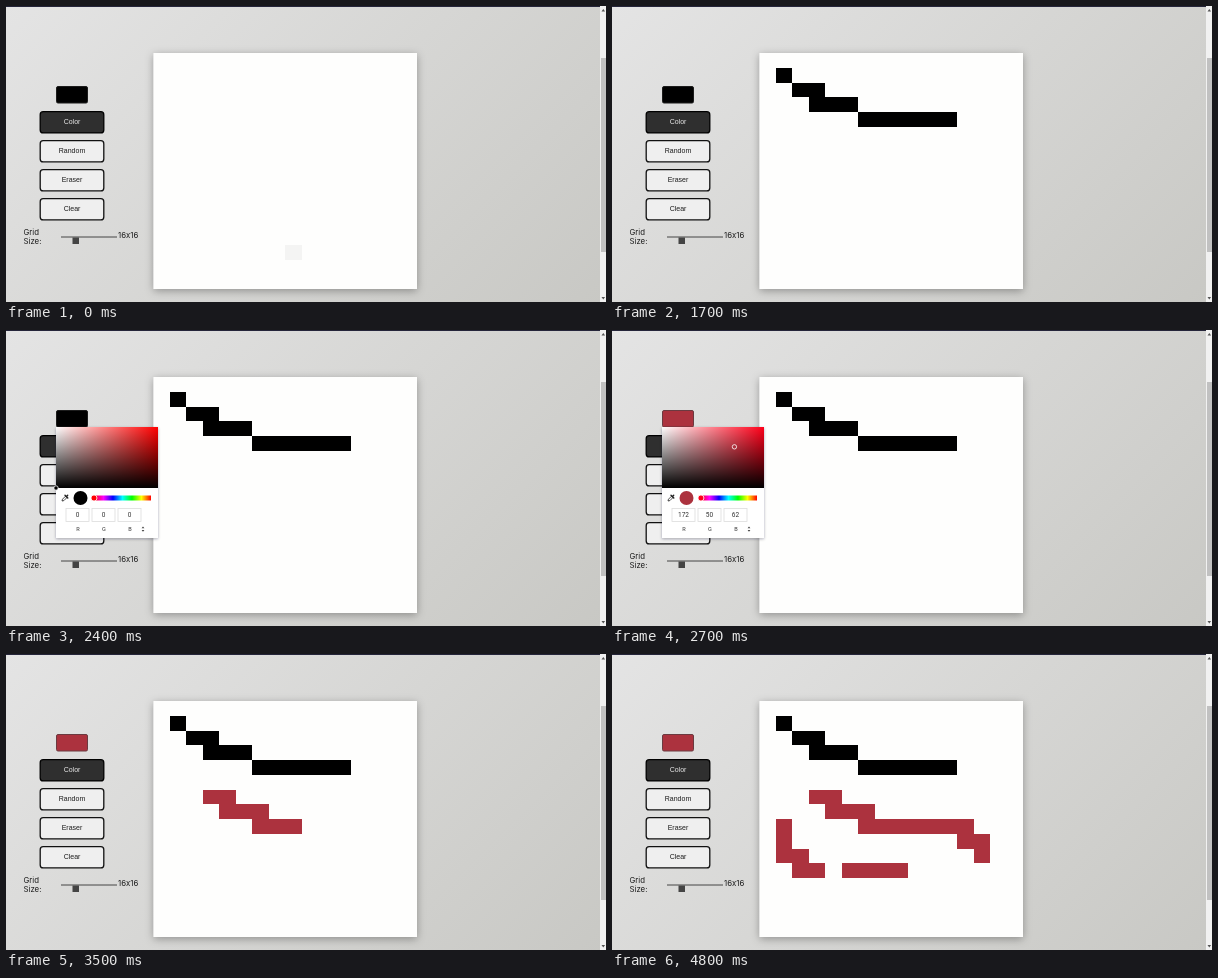
Recreate the animation shown at these times as an HTML page. Size 600 by 296 pixels, loop 5.2 s.

```html
<!DOCTYPE html>
<html lang="en">
<head>
<meta charset="utf-8">
<title>Sketch pad</title>
<style>
  html, body { margin: 0; width: 100%; height: 100%; overflow: hidden; }
  svg { display: block; width: 600px; height: 296px; }
  text { fill: #1c1c1c; }
  .button text { font: 7px "Liberation Sans", Arial, sans-serif; text-anchor: middle; }
  .label { font: 7.8px Inter, sans-serif; }
  .picker text { font: 5.6px Roboto, sans-serif; text-anchor: middle; fill: #333; }
</style>
</head>
<body>
<svg viewBox="0 0 600 296">
  <defs>
    <linearGradient id="page" gradientUnits="userSpaceOnUse" x1="0" y1="0" x2="448" y2="448">
      <stop stop-color="#e4e4e4"/><stop offset="1" stop-color="#c8c8c4"/>
    </linearGradient>
    <linearGradient id="white"><stop stop-color="#fff"/><stop offset="1" stop-color="#fff" stop-opacity="0"/></linearGradient>
    <linearGradient id="black" x2="0" y2="1"><stop stop-opacity="0"/><stop offset="1"/></linearGradient>
    <linearGradient id="hues"></linearGradient>
    <filter id="soft" x="-20%" y="-20%" width="140%" height="140%">
      <feDropShadow dx="0" dy="2" stdDeviation="4" flood-opacity=".32"/>
    </filter>
    <filter id="near" x="-20%" y="-20%" width="140%" height="140%">
      <feDropShadow dx="0" dy="1" stdDeviation="1.5" flood-color="#223" flood-opacity=".35"/>
    </filter>
  </defs>

  <rect width="600" height="296" fill="url(#page)"/>
  <rect width="594" height="1" fill="#25253a"/>

  <rect x="594" width="6" height="296" fill="#f1f1f1"/>
  <rect x="595" y="52" width="5" height="194" fill="#c1c1c1"/>
  <path d="M595.5 5.5l1.8-2.5 1.8 2.5zM595.5 291l1.8 2.5 1.8-2.5z" fill="#555"/>

  <rect x="147.5" y="47" width="263.5" height="236" fill="#fefefd" filter="url(#soft)"/>
  <g id="cells" shape-rendering="crispEdges"></g>

  <rect id="swatch" x="50.5" y="80.5" width="31" height="16.5" rx="1.5"/>
  <g id="buttons"></g>

  <text class="label" x="17.5" y="228.8">Grid</text>
  <text class="label" x="17.5" y="238.4">Size:</text>
  <text class="label" x="112" y="232">16x16</text>
  <path d="M55 231H111" stroke="#444"/>
  <rect x="66.5" y="231.5" width="6.5" height="6.5" fill="#444"/>

  <g id="popup">
    <rect id="panel" x="50" y="97" width="102" height="111" filter="url(#near)"/>
    <g id="picker" class="picker">
      <rect id="tone" x="50" y="97" width="102" height="61"/>
      <rect x="50" y="97" width="102" height="61" fill="url(#white)"/>
      <rect x="50" y="97" width="102" height="61" fill="url(#black)"/>
      <circle id="spot" r="2.2" stroke="#fff" stroke-width=".8"/>
      <path d="M56 171l.5-1.8 3-3 1.4 1.4-3 3z" fill="none" stroke="#222" stroke-width=".8"/>
      <path d="M59 165.2l2.8 2.8M60.3 166.7l1.4-1.4" stroke="#222" stroke-width="1.4" stroke-linecap="round"/>
      <circle id="sample" cx="74.5" cy="168" r="7"/>
      <rect x="88" y="165.5" width="57" height="5" fill="url(#hues)"/>
      <circle id="knob" cy="168" r="3" stroke="#fff" stroke-width=".8"/>
      <g id="fields"></g>
      <path d="M135.6 198.2l1.4-1.8 1.4 1.8zM135.6 200l1.4 1.8 1.4-1.8z" fill="#444"/>
    </g>
  </g>
</svg>
<script>
const LOOP = 5200, CELL_W = 263.5 / 16, CELL_H = 236 / 16;
const RED = { h: 354, s: 0.71, v: 0.675 };
const $ = id => document.getElementById(id);

function make(parent, tag, attrs, text = "") {
  const node = document.createElementNS("http://www.w3.org/2000/svg", tag);
  set(node, attrs);
  node.textContent = text;
  return parent.appendChild(node);
}
function set(node, attrs) {
  for (const key in attrs) node.setAttribute(key, attrs[key]);
}
function show(node, visible) {
  node.style.display = visible ? "" : "none";
}
function toRgb({ h, s, v }) {
  return [5, 3, 1].map(n => {
    const k = (n + h / 60) % 6;
    return Math.round(255 * v * (1 - s * Math.max(0, Math.min(k, 4 - k, 1))));
  });
}
const css = rgb => `rgb(${rgb})`;
const hueColor = h => css(toRgb({ h, s: 1, v: 1 }));
const paint = css(toRgb(RED));

// Each run: start time, row, first column, number of cells.
const runs = [
  [600, 1, 1, 1], [700, 2, 2, 2], [800, 3, 3, 2], [900, 3, 5, 1],
  [1000, 4, 6, 2], [1100, 4, 8, 2], [1200, 4, 10, 1], [1300, 4, 11, 1],
  [3200, 6, 3, 2], [3300, 7, 4, 2], [3400, 7, 6, 1], [3400, 8, 6, 1],
  [3500, 8, 7, 2], [3600, 8, 9, 2], [3700, 8, 11, 2], [3800, 9, 12, 1],
  [3900, 9, 13, 1], [4000, 10, 13, 1],
  [4300, 8, 1, 1], [4400, 9, 1, 1], [4500, 10, 1, 2], [4600, 11, 2, 2],
  [4700, 11, 5, 2], [4800, 11, 7, 2]
];
// Hovered cells: start time, row, column; each lasts one step.
const hovers = [[0, 13, 8], [3100, 6, 3], [3600, 8, 11]];

function addCells(start, end, row, col, count, fill) {
  const node = make($("cells"), "rect", {
    x: 147.5 + col * CELL_W, y: 47 + row * CELL_H,
    width: count * CELL_W, height: CELL_H, fill
  });
  return { node, start, end };
}
const cells = [
  ...hovers.map(([t, row, col]) => addCells(t, t + 100, row, col, 1, "#f4f4f3")),
  ...runs.map(([t, row, col, n]) => addCells(t, LOOP, row, col, n, t < 3000 ? "#000" : paint))
];

["Color", "Random", "Eraser", "Clear"].forEach((name, i) => {
  const y = 105.7 + 29 * i, active = i === 0;
  const group = make($("buttons"), "g", { class: "button" });
  make(group, "rect", {
    x: 34.2, y, width: 63.6, height: 21.2, rx: 3, "stroke-width": 1.3,
    fill: active ? "#2f2f2f" : "#efefef", stroke: active ? "#000" : "#111"
  });
  make(group, "text", { x: 66, y: y + 11.9, style: active ? "fill:#e8e8e8" : "" }, name);
});

for (let i = 0; i <= 6; i++)
  make($("hues"), "stop", { offset: i / 6, "stop-color": hueColor(360 - 60 * i) });

const fields = ["R", "G", "B"].map((name, i) => {
  const x = 71.5 + 26 * i;
  make($("fields"), "rect", { x: x - 11.5, y: 178.5, width: 23, height: 13, fill: "#fff", stroke: "#ddd", "stroke-width": 0.8 });
  make($("fields"), "text", { x: x + 0.5, y: 201 }, name);
  return make($("fields"), "text", { x, y: 187, style: "font-size:6.5px" });
});

function pickedColor(t) {
  if (t < 2600) return { h: 0, s: 0, v: 0 };
  if (t < 2700) return { h: 354, s: 0.5, v: 0.45 };
  return RED;
}

function render(t) {
  for (const { node, start, end } of cells) show(node, t >= start && t < end);

  const color = pickedColor(t), rgb = toRgb(color), fill = css(rgb);
  set($("swatch"), { fill, stroke: t < 2600 ? "#1c1c1c" : "#6b3a40" });

  show($("popup"), t >= 2100 && t < 3100);
  show($("picker"), t >= 2400);
  set($("panel"), { fill: t < 2400 ? "#2b2a28" : "#fff" });
  set($("tone"), { fill: hueColor(color.h) });
  set($("spot"), { cx: 50 + 102 * color.s, cy: 97 + 61 * (1 - color.v), fill });
  set($("sample"), { fill });
  set($("knob"), { cx: 88 + 57 * ((360 - color.h) % 360) / 360, fill: hueColor(color.h) });
  fields.forEach((field, i) => field.textContent = rgb[i]);
}

const began = performance.now();
function tick() {
  render((performance.now() - began) % LOOP);
  requestAnimationFrame(tick);
}
tick();
</script>
</body>
</html>
```
